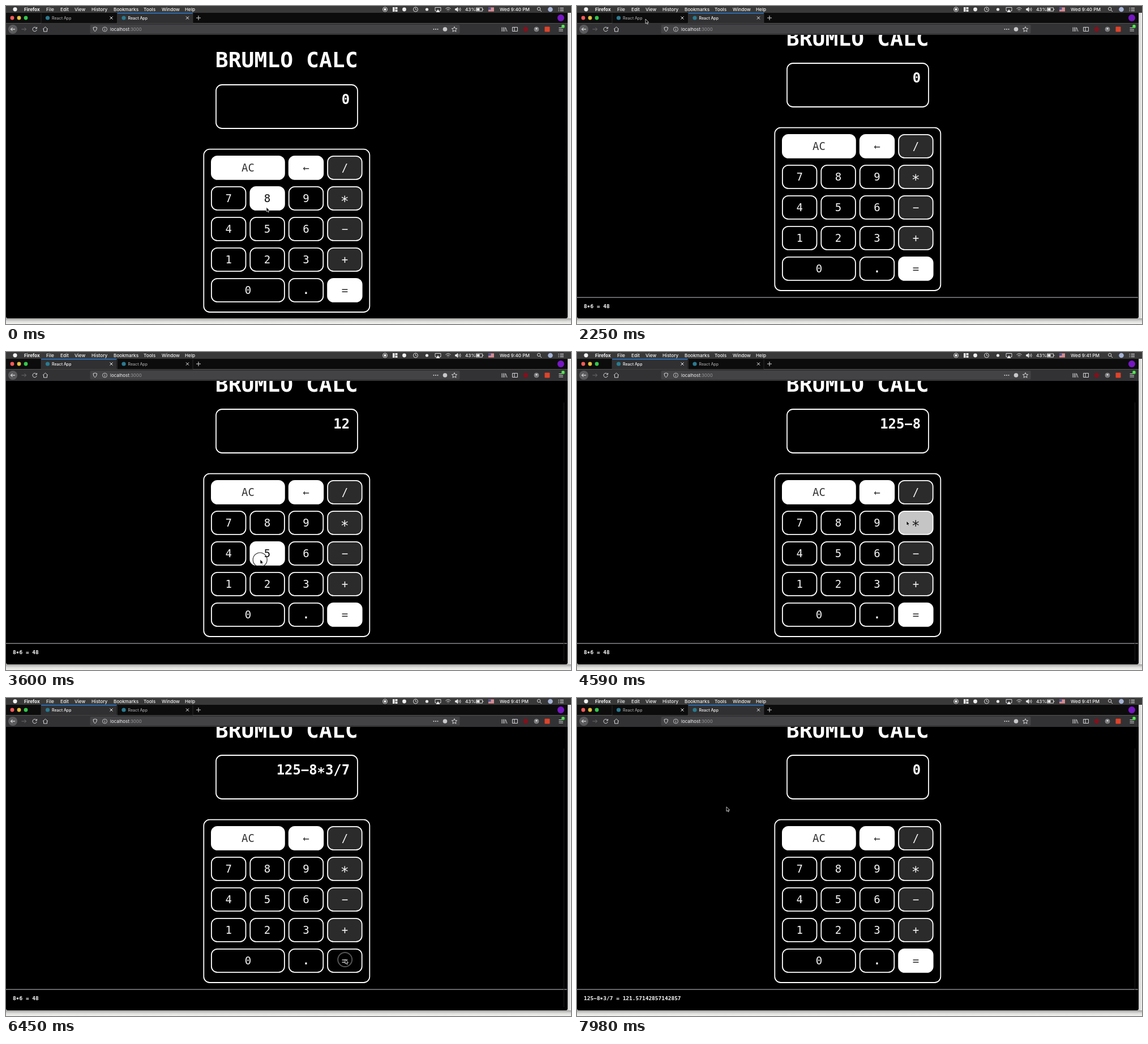
These frames come from a looping animation (998x561 px, 8000 ms). An HTML page:

```html
<!DOCTYPE html>
<html lang="en">
<head>
<meta charset="utf-8">
<title>Calculator</title>
<style>
html, body { margin: 0; width: 100%; height: 100%; overflow: hidden; background: #000; }
svg { display: block; width: 998px; height: 561px; }
text { white-space: pre; }
.ui { font-family: Inter, sans-serif; fill: #f4f4f4; }
.menu { font-size: 8.2px; font-weight: 500; }
.tab { font-size: 7px; font-weight: 500; }
.mono { font-family: "DejaVu Sans Mono", monospace; fill: #fff; }
.bold { font-weight: 700; }
</style>
</head>
<body>
<svg id="stage" viewBox="0 0 998 561">
  <defs>
    <clipPath id="view"><path d="M0 51H992V548Q992 551 989 551H3Q0 551 0 548Z"/></clipPath>
    <linearGradient id="below" x2="0" y2="1"><stop stop-color="#a2a2a0"/><stop offset=".5" stop-color="#dcdcda"/><stop offset="1" stop-color="#f4f4f0"/></linearGradient>
    <linearGradient id="beside"><stop stop-color="#c8c8c8"/><stop offset="1" stop-color="#f4f4f2"/></linearGradient>
  </defs>
  <rect width="998" height="561" fill="#e6e6e4"/>
  <rect x="992" y="12" width="6" height="549" fill="url(#beside)"/>
  <rect y="551" width="998" height="10" fill="url(#below)"/>
  <path d="M0 51H992V548Q992 551 989 551H3Q0 551 0 548Z"/>
  <g clip-path="url(#view)">
    <g id="page"></g>
    <path id="bar" stroke="#1e1e1e" fill="none"/>
  </g>
  <g id="chrome"></g>
  <circle id="ring" r="12.5" fill="none"/>
  <path id="cursor" d="M0 0V8L1.9 6.4L3.1 9L4.4 8.4L3.2 5.9H5.7Z" fill="#000" stroke="#eee" stroke-width=".8"/>
</svg>
<script>
const $ = id => document.getElementById(id);
const page = $('page'), chrome = $('chrome');

function add(parent, tag, attrs, content) {
  const node = document.createElementNS('http://www.w3.org/2000/svg', tag);
  for (const name in attrs) node.setAttribute(name, attrs[name]);
  if (content !== undefined) node.textContent = content;
  parent.append(node);
  return node;
}
const rect = (parent, x, y, width, height, attrs) => add(parent, 'rect', { x, y, width, height, ...attrs });
const dot = (cx, cy, r, fill) => add(chrome, 'circle', { cx, cy, r, fill });
const icon = (d, attrs) => add(chrome, 'path', { d, fill: 'none', stroke: '#d8d8da', ...attrs });
const label = (x, y, content, kind, attrs) => add(chrome, 'text', { x, y, class: 'ui ' + kind, ...attrs }, content);

// Menu bar
rect(chrome, 0, 0, 998, 12, { fill: '#39393a' });
dot(16, 5.8, 3.6, '#f4f4f4');
label(32, 9, 'Firefox', 'menu bold', { style: 'font-weight:700' });
[[71, 'File'], [96, 'Edit'], [121, 'View'], [151, 'History'], [190, 'Bookmarks'], [243, 'Tools'],
 [275, 'Window'], [316, 'Help'], [811, '43%']].forEach(([x, name]) => label(x, 9, name, 'menu'));
const clock = label(872, 9, '', 'menu');
icon('M665.5 6a4 4 0 1 0 8 0a4 4 0 1 0-8 0');
dot(669.5, 6, 2.2, '#eee');
rect(chrome, 683, 2, 3.5, 8, { fill: '#eee' });
rect(chrome, 687.5, 2, 4, 3.5, { fill: '#eee' });
rect(chrome, 687.5, 6.5, 4, 3.5, { fill: '#eee' });
dot(703.5, 6, 3.4, '#eee');
icon('M719.5 6a4 4 0 1 0 8 0a4 4 0 1 0-8 0M723.5 3.5V6L725.5 7');
dot(743.5, 6, 2.6, '#eee');
icon('M760 8.5H758V2.5H768V8.5H766');
icon('M763 6.5L766 10.5H760Z', { fill: '#eee' });
icon('M776.5 4.8Q781 .8 785.5 4.8M778.5 6.8Q781 4.6 783.5 6.8M780.5 9L781 8.5L781.5 9');
icon('M793.5 4.8H795L798 2.5V9.5L795 7.2H793.5Z', { fill: '#eee' });
icon('M800 4Q801.4 6 800 8M802 2.7Q804.4 6 802 9.3');
icon('M830.5 3H841.5V9H830.5ZM842.8 5V7');
rect(chrome, 831.5, 4, 5, 4, { fill: '#eee' });
rect(chrome, 852, 2.5, 10, 7, { fill: '#e8dede' });
for (let y = 2.5; y < 9; y += 2) rect(chrome, 852, y, 10, 1, { fill: '#c04048' });
rect(chrome, 852, 2.5, 4.5, 4, { fill: '#46508f' });
icon('M938.5 5a2.7 2.7 0 1 0 5.4 0a2.7 2.7 0 1 0-5.4 0M943.2 7L946 10');
dot(961.5, 6, 4.3, '#a5b4d6');
icon('M975.5 3.5H977M978.5 3.5H985M975.5 6H977M978.5 6H985M975.5 8.5H977M978.5 8.5H985');

// Tabs
rect(chrome, 0, 12, 992, 18.5, { fill: '#0c0c0d' });
['#fc5b57', '#e5bf3c', '#34c84a'].forEach((fill, i) => dot(11 + 12 * i, 21, 3.4, fill));
const tabs = [62, 196.5].map(x => {
  const back = rect(chrome, x, 12, 133.5, 18.5);
  const line = rect(chrome, x, 12, 133.5, 1.3, { fill: '#2583e8' });
  dot(x + 11.5, 21, 3.6, '#2a7b91');
  const text = label(x + 19, 23.8, 'React App', 'tab');
  icon(`M${x + 121.5} 18.5l5 5m0-5l-5 5`, { stroke: '#f2f2f2' });
  return { back, line, text };
});
icon('M62 13V30M196.5 13V30M330 13V30', { stroke: '#3a3a3c', 'stroke-width': .7 });
icon('M336 21H344M340 17V25');
dot(980, 21, 6, '#7717c4');

// Toolbar
rect(chrome, 0, 30.5, 992, 20.5, { fill: '#323234' });
dot(12, 41, 8, '#5b5b5e');
icon('M16 41H8.5M11.5 38L8.5 41L11.5 44', { stroke: '#fff' });
icon('M27.5 41H35.5M32.5 38L35.5 41L32.5 44', { stroke: '#6d6d70' });
icon('M53.8 39A3.7 3.7 0 1 0 54.3 42M54.5 37V39.8H51.7');
icon('M65 41L69.5 37L74 41M66.5 40.5V45H72.5V40.5');
rect(chrome, 148.5, 33, 653, 15.5, { fill: '#434346', rx: 2 });
icon('M154 38L157.3 37L160.6 38Q160.5 43 157.3 45Q154 43 154 38Z');
icon('M170.5 41a4 4 0 1 0 8 0a4 4 0 1 0-8 0M174.5 40.3V43.5M174.5 38.3V39.4', { 'stroke-width': .8 });
const address = label(184, 43.8, 'localhost', '', { 'font-size': 7.9 });
add(address, 'tspan', { fill: '#98989b' }, ':3000');
[755.5, 759, 762.5].forEach(x => dot(x, 41, 1, '#d8d8da'));
dot(775.5, 41, 3.8, '#c8c8ca');
icon('M792 36.5L793.4 39.5L796.6 39.8L794.2 42L795 45.2L792 43.5L789 45.2L789.8 42L787.4 39.8L790.6 39.5Z');
icon('M876 37.5V45M878.5 37.5V45M881 37.5V45M882.5 38L885 45');
icon('M894.5 37.5H903.5V44.5H894.5ZM898 37.5V44.5');
dot(918, 41, 4.2, '#84101c');
icon('M933 41a4 4 0 1 0 8 0a4 4 0 1 0-8 0', { fill: '#77777a', stroke: '#8a8a8d' });
dot(937, 40, 1.6, '#ddd');
rect(chrome, 951.5, 36.5, 9, 9, { fill: '#df432b', rx: 1 });
icon('M976.5 38.5H984M976.5 41.3H984M976.5 44H984');
dot(984, 36, 3.2, '#2fc52f');
icon('M984 38V34.3M982.6 35.7L984 34.3L985.4 35.7', { stroke: '#fff', 'stroke-width': .7 });

// Calculator page
const mono = (x, y, size, content, attrs) => add(page, 'text', { x, y, class: 'mono', 'font-size': size, ...attrs }, content);
const frame = (x, y, w, h, rx) => rect(page, x, y, w, h, { rx, fill: '#000', stroke: '#fff', 'stroke-width': 1.8 });
mono(495.7, 107.5, 38, 'BRUMLO CALC', { class: 'mono bold', 'text-anchor': 'middle' });
frame(371, 139, 250, 77, 10.5);
const display = mono(607.1, 172.7, 23.9, '', { class: 'mono bold', 'text-anchor': 'end' });
frame(349.3, 252.7, 293, 287.3, 10.5);

const looks = {
  digit: { rest: ['#000', '#f4f4f4'], hover: ['#fff', '#111'] },
  light: { rest: ['#fff', '#333'], hover: ['#000', '#b8b8b8'] },
  operator: { rest: ['#2b2b2b', '#f4f4f4'], hover: ['#c5c5c5', '#1a1a1a'] }
};
const rows = [
  [['AC', 2], ['←', 1], ['/', 1]],
  [['7', 1], ['8', 1], ['9', 1], ['∗', 1]],
  [['4', 1], ['5', 1], ['6', 1], ['−', 1]],
  [['1', 1], ['2', 1], ['3', 1], ['+', 1]],
  [['0', 2], ['.', 1], ['=', 1]]
];
const keys = [];
rows.forEach((row, r) => {
  let column = 0;
  for (const [name, span] of row) {
    const x = 362.9 + 68.4 * column, y = 264.9 + 54 * r, w = 60.6 + 68.4 * (span - 1), h = 41;
    const look = looks[/AC|←|=/.test(name) ? 'light' : /[/∗−+]/.test(name) ? 'operator' : 'digit'];
    const size = name === '∗' ? 25 : 19;
    const box = frame(x, y, w, h, 10.5);
    const text = mono(x + w / 2, y + 27.3 + (size - 19) * .35, size, name, { 'text-anchor': 'middle' });
    if (name === '.') text.classList.add('bold');
    keys.push({ x, y, w, h, look, box, text });
    column += span;
  }
});
const log = add(page, 'g', {});
rect(log, 0, 551.6, 991, 1, { fill: '#c9c9cf' });
const entry = add(log, 'text', { x: 12, y: 571, class: 'mono bold', 'font-size': 9.5 });

// Pointer stops: time, x, y
const path = [
  [0, 460, 355], [170, 460, 355], [380, 594, 342], [460, 594, 342], [660, 530, 397], [760, 530, 397],
  [990, 606, 507], [1140, 608, 509], [1650, 608, 509], [2180, 121, 23], [2400, 121, 23],
  [2820, 393, 411], [2970, 393, 411], [3150, 455, 410], [3310, 455, 410], [3480, 449, 366], [3690, 449, 366],
  [3870, 592, 358], [4030, 592, 358], [4230, 466, 305], [4370, 466, 305], [4570, 582, 298], [4740, 583, 299],
  [5030, 532, 411], [5180, 532, 411], [5520, 597, 251], [5670, 597, 251], [5960, 396, 304], [6110, 396, 304],
  [6370, 599, 461], [6600, 599, 461], [7110, 232, 22], [7290, 232, 22], [7800, 264, 190], [8000, 264, 192]
];
// Clicks: time, display afterwards
const clicks = [
  [150, '8'], [440, '8∗'], [740, '8∗6'], [1060, '0'], [2370, '0'],
  [2940, '1'], [3280, '12'], [3660, '125'], [4000, '125−'], [4340, '125−8'], [4710, '125−8∗'],
  [5150, '125−8∗3'], [5640, '125−8∗3/'], [6080, '125−8∗3/7'], [6500, '0'], [7260, '0']
];

const clamp = v => Math.max(0, Math.min(1, v));
const ease = v => v * v * (3 - 2 * v);
const ramp = (t, from, to) => ease(clamp((t - from) / (to - from)));

function pointer(t) {
  const i = Math.max(1, path.findIndex(stop => stop[0] > t));
  const [t0, x0, y0] = path[i - 1], [t1, x1, y1] = path[i];
  const k = ramp(t, t0, t1);
  return [x0 + (x1 - x0) * k, y0 + (y1 - y0) * k];
}

function draw(t) {
  const [x, y] = pointer(t);
  const firstTab = t >= 2370 && t < 7260;
  const scroll = 38 * (firstTab ? ramp(t, 2490, 2700) : ramp(t, 1320, 1560));
  page.setAttribute('transform', `translate(0 ${-scroll})`);
  $('cursor').setAttribute('transform', `translate(${x} ${y})`);

  const last = clicks.filter(c => c[0] <= t).pop();
  display.textContent = last ? last[1] : '0';
  clock.textContent = t < 4100 ? 'Wed 9:40 PM' : 'Wed 9:41 PM';
  log.setAttribute('visibility', t < 1060 ? 'hidden' : 'visible');
  entry.textContent = t < 6500 ? '8∗6 = 48' : '125−8∗3/7 = 121.57142857142857';

  const barShown = t >= 2370 || (t >= 1060 && t < 2000);
  $('bar').setAttribute('visibility', barShown ? 'visible' : 'hidden');
  $('bar').setAttribute('d', `M985.5 ${54 + scroll * .92}V${515 + (firstTab ? scroll * .8 : 0)}`);

  tabs.forEach(({ back, line, text }, i) => {
    const active = firstTab === (i === 0);
    back.setAttribute('fill', active ? '#303032' : '#0c0c0d');
    line.setAttribute('visibility', active ? 'visible' : 'hidden');
    text.setAttribute('style', `fill:${active ? '#f9f9fa' : '#a5a5a7'}`);
  });

  let overWhite = false;
  for (const key of keys) {
    const dx = x - key.x, dy = y + scroll - key.y;
    const hover = dx >= 0 && dx <= key.w && dy >= 0 && dy <= key.h;
    const [fill, ink] = hover ? key.look.hover : key.look.rest;
    key.box.setAttribute('fill', fill);
    key.text.setAttribute('style', `fill:${ink}`);
    if (hover && fill !== '#000') overWhite = true;
  }

  const pressed = clicks.some(([at]) => t >= at - 90 && t < at + 50);
  const ring = $('ring');
  ring.setAttribute('visibility', pressed ? 'visible' : 'hidden');
  ring.setAttribute('cx', x - .3);
  ring.setAttribute('cy', y + .5);
  ring.setAttribute('stroke', overWhite ? '#222' : '#555');
  ring.setAttribute('stroke-width', overWhite ? 1.1 : 2);
}

function tick() {
  const t = performance.now() % 8000;
  draw(t - t % 30);
  requestAnimationFrame(tick);
}
tick();
</script>
</body>
</html>
```
